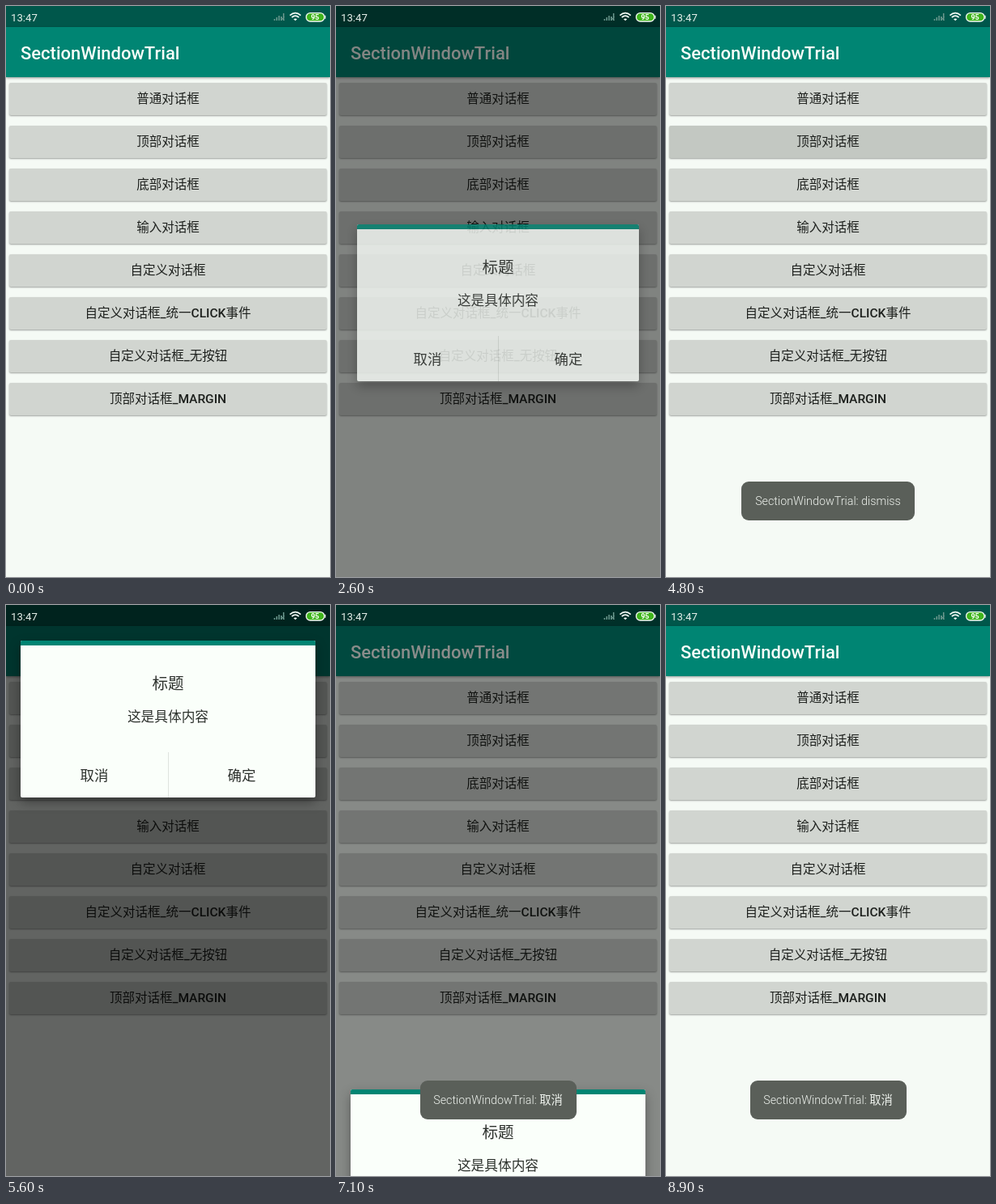
These frames come from a looping animation (400 px wide and 706 px high, 9000 ms). An HTML page:

```html
<!DOCTYPE html>
<html lang="zh-CN">
<head>
<meta charset="utf-8">
<title>Dialogs</title>
<style>
html, body { margin: 0; width: 100%; height: 100%; overflow: hidden; }
body { font-family: Roboto, "Noto Sans CJK SC", "Noto Sans CJK", sans-serif; }
#stage { position: relative; width: 400px; height: 706px; overflow: hidden; background: #f5faf5; }
#stage div, #stage svg { position: absolute; white-space: nowrap; }
.bar { left: 0; top: 0; width: 400px; height: 26px; background: #00574b; }
.tool { left: 0; top: 26px; width: 400px; height: 62px; background: #008573;
  box-shadow: 0 1px 3px rgba(0,0,0,.4); }
.tool div { left: 18px; top: 18px; font: 500 22px/30px Roboto, sans-serif; color: #fafffa; }
.btn { left: 4px; width: 392px; height: 40px; border-radius: 2px; background: #d1d5d0;
  box-shadow: 0 1px 2px rgba(0,0,0,.36); text-align: center;
  font-weight: 500; font-size: 15.5px; line-height: 41px; color: #1c1f1c; }
.btn.pressed { background: #c3c8c2; }
#dim { inset: 0; background: #000; }
.dlg { height: 194px; background: #fafffa; border-radius: 2px; overflow: hidden; color: #2c302c;  }
.wrap { height: 194px; border-radius: 2px; box-shadow: 0 6px 14px rgba(0,0,0,.34); }
.dlg .edge { left: 0; top: 0; width: 100%; height: 6px; background: #008573; }
.dlg .txt { text-align: center; line-height: 30px; height: 30px; }
.dlg .split { left: 50%; top: 138px; width: 1px; height: 56px; background: #dfe4df; }
.toast { top: 588px; height: 48px; border-radius: 9px; background: #5a5f59; color: #f0f4ef;
  font-size: 14.3px; font-weight: 300; line-height: 49px; text-align: center; }
</style>
</head>
<body>
<div id="stage"></div>
<script>
const LOOP = 9000, STEP = 100, MOVE = 300, DIM = .6;
const NAME = "SectionWindowTrial";
const stage = document.getElementById("stage");

function add(parent, cls, text, style) {
  const el = document.createElement("div");
  el.className = cls;
  el.textContent = text || "";
  Object.assign(el.style, style);
  parent.append(el);
  return el;
}

add(stage, "bar");
const labels = ["普通对话框", "顶部对话框", "底部对话框", "输入对话框", "自定义对话框",
  "自定义对话框_统一CLICK事件", "自定义对话框_无按钮", "顶部对话框_MARGIN"];
const buttons = labels.map((s, i) => add(stage, "btn", s, { top: 95 + i * 53 + "px" }));
add(add(stage, "tool"), "", NAME);
const dim = add(stage, "");
dim.id = "dim";

function panel(x, y) {
  const w = 400 - 2 * x;
  const wrap = add(stage, "wrap", "", { left: x + "px", top: y + "px", width: w + "px" });
  const box = add(wrap, "dlg", "", { left: 0, top: 0, width: w + "px" });
  const text = (s, mid, size, left, width) => add(box, "txt", s, {
    top: mid - 15 + "px", fontSize: size + "px", left: left + "px", width: width + "px"
  });
  add(box, "edge");
  text("标题", 54, 19.5, 0, w);
  text("这是具体内容", 95, 16.7, 0, w);
  text("取消", 167, 17.4, 0, w / 2);
  text("确定", 167, 17.4, w / 2, w / 2);
  add(box, "split");
  return wrap;
}

const clamp = x => Math.min(1, Math.max(0, x));
const easeOut = u => 1 - (1 - u) ** 2;

function pop(el, shown, opened) {
  el.style.opacity = easeOut(shown);
  el.style.transform = `scale(${.6 + .4 * easeOut(opened)})`;
}
const slide = travel => (el, shown) => {
  el.style.transform = `translateY(${travel * (1 - shown)}px)`;
};

const dialogs = [
  { el: panel(26, 270), open: 1340, close: 2465, pose: pop },
  { el: panel(18, 44), open: 4850, close: 6200, pose: slide(-238) },
  { el: panel(18, 494), open: 6950, close: 8400, pose: slide(210) }
];
dialogs[0].el.style.transformOrigin = "40% 32%";

stage.insertAdjacentHTML("beforeend", `
<svg width="400" height="26" style="left:0;top:0" font-family="Roboto, sans-serif">
  <text x="6" y="18.6" font-size="13.2" fill="#e9f1ec">13:47</text>
  <g stroke="#6f9a90" stroke-width="1.5">
    <path d="M331.5 18v-2M334.3 18v-4M337.1 18v-6M339.9 18v-5M342.7 18v-9"/>
    <path d="M339.5 13.5l4 4.5M343.5 13.5l-4 4.5" stroke-width="1"/>
  </g>
  <g fill="none" stroke="#f4faf5" stroke-width="1.7">
    <path d="M350.5 11.6q6.7 -6 13.4 0M352.8 14.1q4.4 -3.9 8.8 0"/>
    <path d="M355 16.2q2.2 -1.6 4.4 0l-2.2 2z" fill="#f4faf5" stroke="none"/>
  </g>
  <rect x="370.6" y="8.6" width="22.4" height="10.4" rx="5" fill="#3fb51c" stroke="#f4faf5" stroke-width="1.3"/>
  <path d="M394 11.8v4" stroke="#f4faf5" stroke-width="1.3"/>
  <text x="381.6" y="17" font-size="8.8" font-weight="700" fill="#fff" text-anchor="middle">95</text>
</svg>`);

function toast(message, width, ...starts) {
  const el = add(stage, "toast", `${NAME}: ${message}`,
    { left: 200 - width / 2 + "px", width: width + "px" });
  return { el, starts };
}
const toasts = [toast("dismiss", 214, 2900), toast("取消", 193, 6300, 8500)];

// Two seconds on screen, with a short fade at both ends.
const toastAlpha = age => clamp(age / 200) * clamp((2200 - age) / 200);

function draw() {
  const t = Math.floor(performance.now() % LOOP / STEP) * STEP;
  let shade = 0;
  dialogs.forEach(({ el, open, close, pose }, i) => {
    const opened = clamp((t - open) / MOVE);
    const shown = opened * (1 - clamp((t - close) / MOVE));
    el.style.visibility = shown > 0 ? "visible" : "hidden";
    pose(el, shown, opened);
    shade = Math.max(shade, easeOut(shown));
    buttons[i].classList.toggle("pressed", Math.abs(t - open) < 100);
  });
  dim.style.opacity = DIM * shade;
  for (const { el, starts } of toasts)
    el.style.opacity = Math.max(...starts.map(s => toastAlpha(t - s)));
  requestAnimationFrame(draw);
}
draw();
</script>
</body>
</html>
```
